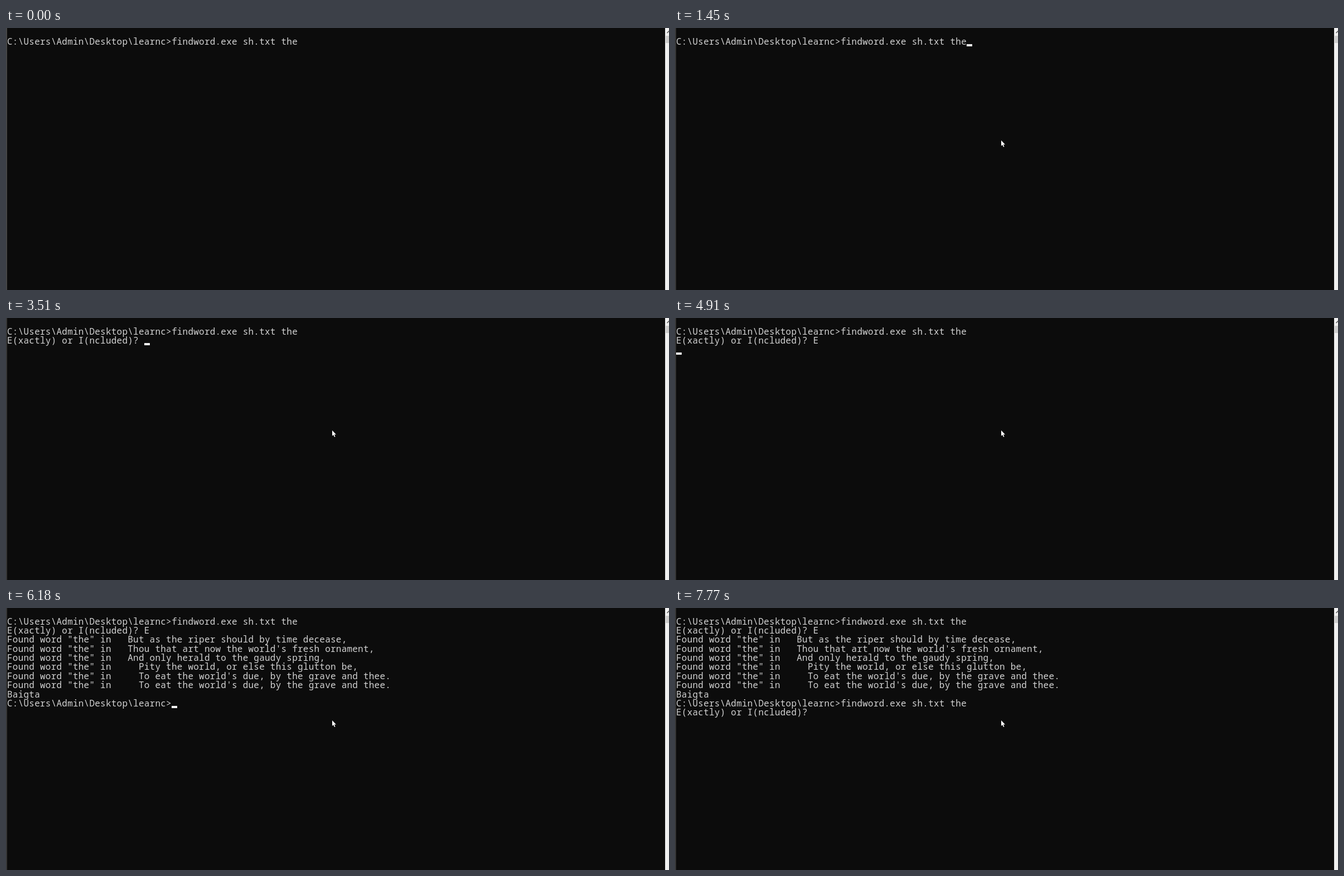
An HTML page with a canvas for the animation above (8 s loop, 1189 by 471 pixels).

```html
<!DOCTYPE html>
<html lang="en">
<head>
<meta charset="utf-8">
<style>
html, body { margin: 0; height: 100%; overflow: hidden; background: #0c0c0c; }
canvas { display: block; }
</style>
</head>
<body>
<canvas id="stage" width="1189" height="471"></canvas>
<script>
const ctx = document.getElementById('stage').getContext('2d');
const LOOP = 8000, CELL = 9.83, ROW = 16.38;

const PROMPT = 'C:\\Users\\Admin\\Desktop\\learnc>';
const COMMAND = PROMPT + 'findword.exe sh.txt the';
const QUESTION = 'E(xactly) or I(ncluded)? ';
const found = (line, indent = 3) => 'Found word "the" in' + ' '.repeat(indent) + line;
const DUE = "To eat the world's due, by the grave and thee.";

const asked = [COMMAND, QUESTION];
const answered = [COMMAND, QUESTION + 'E'];
const results = [
  ...answered,
  found('But as the riper should by time decease,'),
  found("Thou that art now the world's fresh ornament,"),
  found('And only herald to the gaudy spring,'),
  found('Pity the world, or else this glutton be,', 5),
  found(DUE, 5),
  found(DUE, 5),
  'Baigta'
];
const again = [...results, COMMAND];

// [start ms, console lines, cursor on]; the cursor sits after the last line
const screens = [
  [0, [COMMAND], false],
  [1450, [COMMAND], true],
  [1980, [COMMAND], false],
  [2450, [COMMAND, ''], true],
  [2520, asked, false],
  [3510, asked, true],
  [4050, asked, false],
  [4320, answered, true],
  [4580, answered, false],
  [4910, [...answered, ''], true],
  [4980, [...results, PROMPT], true],
  [5640, [...results, PROMPT], false],
  [6180, [...results, PROMPT], true],
  [6380, again, true],
  [6710, again, false],
  [7110, [...again, ''], true],
  [7180, [...again, QUESTION], true],
  [7770, [...again, QUESTION], false]
];

// [start ms, x, y] of the mouse tip
const mouse = [
  [310, 1036, 408], [380, 800, 285], [450, 585, 198], [520, 586, 202], [1050, 585, 202]
];

const at = (list, t) => list.filter(step => step[0] <= t).pop();

function rect(color, x, y, w, h) {
  ctx.fillStyle = color;
  ctx.fillRect(x, y, w, h);
}

function drawWindow(focused) {
  rect('#0c0c0c', 0, 0, 1189, 471);
  rect(focused ? '#363636' : '#464646', 0, 0, 2, 471);
  rect('#f0f0f0', 1182, 0, 7, 471);
  rect('#cdcdcd', 1183, 14, 6, 13);
  ctx.strokeStyle = '#555';
  ctx.lineWidth = 1.4;
  ctx.stroke(new Path2D('M1185.5 9 L1189.5 5'));
}

function drawConsole(lines, cursorOn) {
  ctx.font = '16px "Noto Sans Mono", "DejaVu Sans Mono", monospace';
  ctx.letterSpacing = '0px';
  ctx.letterSpacing = CELL - ctx.measureText('M').width + 'px';
  ctx.fillStyle = '#d2d2d2';
  lines.forEach((line, i) => ctx.fillText(line, 2, Math.round(29.5 + i * ROW)));
  if (cursorOn) {
    const last = lines.length - 1;
    rect('#f2f2f2', Math.round(2 + lines[last].length * CELL), Math.round(29 + last * ROW), 10, 4);
  }
}

function drawMouse(x, y) {
  ctx.save();
  ctx.translate(x, y);
  ctx.fillStyle = '#fff';
  ctx.fill(new Path2D('M0 0 V10 L2.2 8 L4 12 L5.5 11.3 L3.8 7.4 H7 Z'));
  ctx.restore();
}

function frame() {
  const t = performance.now() % LOOP;
  const [, lines, cursorOn] = at(screens, t);
  const pointer = at(mouse, t);
  drawWindow(t >= 920);
  drawConsole(lines, cursorOn);
  if (pointer) drawMouse(pointer[1], pointer[2]);
  requestAnimationFrame(frame);
}
frame();
</script>
</body>
</html>
```
